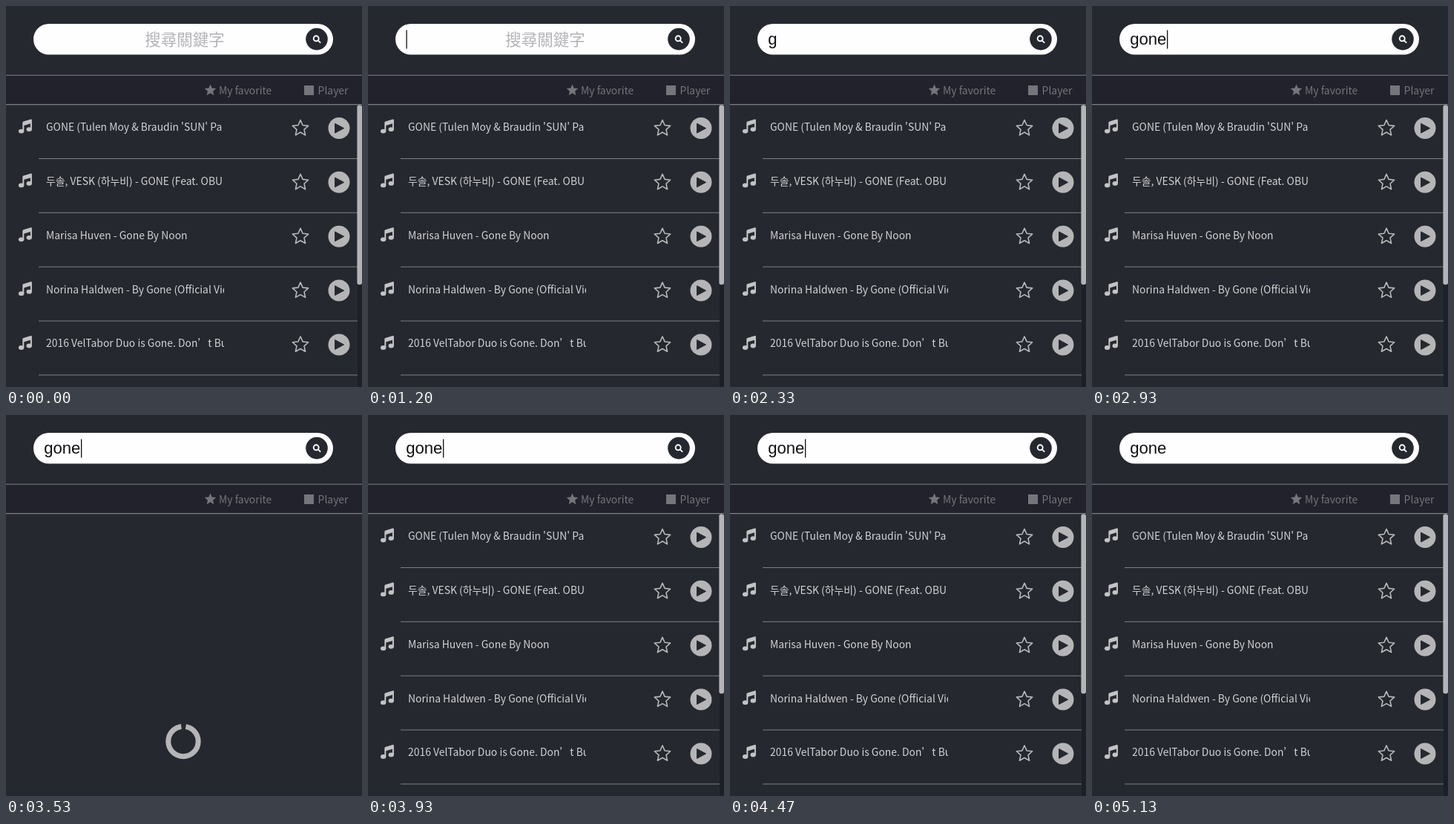
Write an HTML page that moves like this. It is 480 px wide and 513 px high and loops after 5.39 s.

```html
<!DOCTYPE html>
<html lang="zh-Hant">
<head>
<meta charset="utf-8">
<title>Music search</title>
<style>
html, body { margin: 0; width: 100%; height: 100%; overflow: hidden; background: #25282f; }
svg { display: block; width: 480px; height: 513px; }
text { font: 13.9px 'Noto Sans CJK TC', 'Noto Sans CJK KR', 'Noto Sans CJK JP', 'Noto Sans CJK SC', sans-serif; white-space: pre; }
#hint { font-size: 21.5px; fill: #b4b4b6; }
#query { font: 22.1px 'Liberation Sans', Arial, sans-serif; fill: #111; }
</style>
</head>
<body>
<svg viewBox="0 0 480 513">
  <defs>
    <clipPath id="cut"><rect x="50" y="133" width="244" height="380"/></clipPath>
    <g id="note" fill="#c3c3c5">
      <ellipse cx="20.6" cy="168.6" rx="3.7" ry="2.9"/>
      <ellipse cx="31.2" cy="166.1" rx="3.7" ry="2.9"/>
      <path d="M22.3 168.6V157.3Q22.3 156 23.5 155.6L33.4 152.6Q34.9 152.3 34.9 153.8V166.1H32.9V158.3L24.3 160.9V168.6Z"/>
    </g>
    <g id="play">
      <circle cx="449" cy="164.5" r="14.5" fill="#b5b5b7"/>
      <path d="M443.6 158.2V171L455.6 164.6Z" fill="#25282f" stroke="#25282f" stroke-linejoin="round"/>
    </g>
  </defs>
  <rect width="480" height="513" fill="#25282f"/>
  <rect y="93" width="480" height="40" fill="#21222b"/>
  <path d="M0 93.2H480M0 132.6H480" stroke="#7d7f85" stroke-width="1.1"/>
  <rect x="37" y="24" width="404" height="41.5" rx="20.7" fill="#fefdff"/>
  <circle cx="419" cy="44.6" r="14.8" fill="#25282f"/>
  <g fill="none" stroke="#fff" stroke-width="1.9" stroke-linecap="round">
    <circle cx="418.2" cy="43.8" r="3.5"/>
    <path d="M421 46.6L423.6 49.2"/>
  </g>
  <text id="hint" y="53">搜尋關鍵字</text>
  <text id="query" x="51.2" y="52.3"></text>
  <rect id="caret" y="32.5" width="1.3" height="25" fill="#111"/>
  <g fill="#74767c">
    <path id="fav"/>
    <text x="287" y="118.6">My favorite</text>
    <rect x="402" y="107" width="13" height="13"/>
    <text x="420.6" y="118.6">Player</text>
  </g>
  <g id="list">
    <rect x="474" y="133" width="6" height="380" fill="#1e2028"/>
    <rect id="hover" width="474" height="73" fill="#4a9af5"/>
    <g id="rows"></g>
    <rect x="473.4" y="133.3" width="6.6" height="242" rx="3" fill="#b4b4b6"/>
  </g>
  <circle id="spin" cx="239" cy="439.5" r="20.2" fill="none" stroke="#b5b5b7" stroke-width="7"/>
</svg>
<script>
const $ = id => document.getElementById(id);
const show = (id, on) => $(id).setAttribute('visibility', on ? 'visible' : 'hidden');

const LOOP = 5390, FPS = 15, TOP = 132.7, PITCH = 72.85;
const titles = [
  "GONE (Tulen Moy & Braudin 'SUN' Pa",
  '두솔, VESK (하누비) - GONE (Feat. OBU',
  'Marisa Huven - Gone By Noon',
  'Norina Haldwen - By Gone (Official Video)',
  '2016 VelTabor Duo is Gone. Don’t Buy it'
];

function star(cx, cy, r, inner) {
  let d = '';
  for (let i = 0; i < 10; i++) {
    const a = i * Math.PI / 5, k = i % 2 ? r * inner : r;
    d += (i ? 'L' : 'M') + (cx + k * Math.sin(a)).toFixed(2) + ' ' + (cy - k * Math.cos(a)).toFixed(2);
  }
  return d + 'Z';
}

$('fav').setAttribute('d', star(275.5, 113.6, 8.2, 0.46));

$('rows').innerHTML = titles.map((title, i) => {
  const dy = i * PITCH;
  return `<g transform="translate(0 ${dy})"><use href="#note"/><use href="#play"/>
    <path d="${star(397, 164.8, 11.2, 0.47)}" fill="none" stroke="#b9b9bb" stroke-width="1.6" stroke-linejoin="round"/>
    <path d="M44 205.5H474" stroke="#7d7f85"/></g>
    <g clip-path="url(#cut)"><text x="54" y="${168 + dy}" fill="#d3d3d5">${title.replace('&', '&amp;')}</text></g>`;
}).join('');

// gap of the ring sits at the top when the turn is zero
const ring = 2 * Math.PI * 20.2, gap = 7;
$('spin').setAttribute('stroke-dasharray', `${ring - gap} ${gap}`);
$('spin').setAttribute('stroke-dashoffset', -gap / 2);

// last value whose start step has been reached
const at = (n, keys) => keys.reduce((v, [from, val]) => n >= from ? val : v, null);
const typed = [[0, 0], [28, 1], [37, 2], [38, 3], [44, 4]];
const caretOn = [[0, false], [18, true], [35, false], [37, true], [51, false], [52, true], [77, false]];
const hovered = [[0, -1], [60, 0], [61, 5], [62, -1], [63, 5], [67, -1], [68, 5], [70, -1]];

function draw(t) {
  const n = Math.floor((t + 4) * FPS / 1000), ms = n * 1000 / FPS;

  const p = Math.min(1, Math.max(0, (ms - 1184) / 216));
  const len = at(n, typed);
  $('hint').setAttribute('x', 187.3 - 128 * p * p * (3 - 2 * p));
  show('hint', !len);
  $('query').textContent = 'gone'.slice(0, len);
  $('caret').setAttribute('x', 51.4 + len * 12.4);
  show('caret', at(n, caretOn));

  const loading = n >= 52 && n < 59;
  $('list').style.display = loading ? 'none' : '';
  show('spin', loading && n >= 53);
  $('spin').setAttribute('transform', `rotate(${-90 + (n - 53) * 24} 239 439.5)`);

  const row = at(n, hovered);
  show('hover', row >= 0);
  $('hover').setAttribute('y', TOP + row * PITCH);
}

const start = performance.now();
function tick() {
  draw((performance.now() - start) % LOOP);
  requestAnimationFrame(tick);
}
tick();
</script>
</body>
</html>
```
